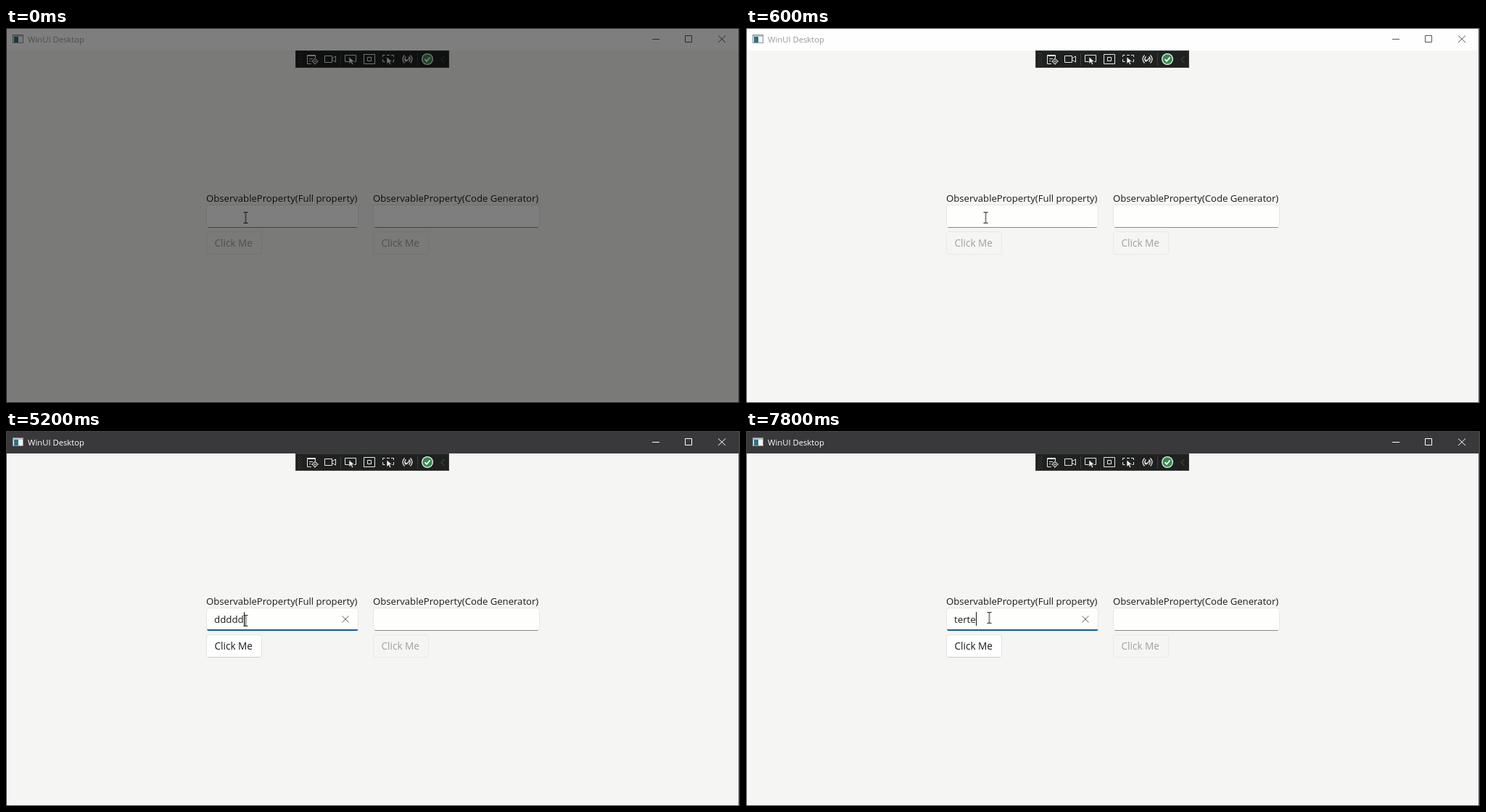
An HTML page that plays this animation: 1012x518 px, repeating every 8000 ms.

```html
<!DOCTYPE html>
<html lang="en">
<head>
<meta charset="utf-8">
<title>WinUI Desktop</title>
<style>
  html, body { margin: 0; width: 100%; height: 100%; overflow: hidden; background: #f5f5f4; }
  svg { position: absolute; left: 0; top: 0; width: 1012px; height: 518px; display: block; }
  svg, .entry { font-family: "Open Sans", "Noto Sans", sans-serif; }
  .label { font-size: 13.13px; fill: #1b1b1b; }
  .caption { font-size: 13.6px; fill: currentColor; }
  .title { font-size: 11.27px; fill: currentColor; }
  .line { fill: none; stroke: currentColor; }
  .field { fill: #fefefd; stroke: #e6e6e5; }
  .button { fill: #f5f5f4; stroke: #e8e8e7; color: #a1a1a1; }
  .button text { stroke: none; }

  .entry { position: absolute; left: 287px; top: 250px; height: 20px; display: flex;
           font-size: 13.3px; line-height: 20px; color: #1b1b1b; white-space: nowrap; }
  .entry span { flex: none; width: 0; overflow: hidden; }
  .entry i { flex: none; width: 1px; height: 19px; background: #111; }

  .bar, .fg, .hover, .focus, .live, .clear, .first, .second, .pointer, .dim, .entry i {
    animation: 8s step-end infinite; }
  .bar { animation-name: bar; }
  .fg { animation-name: fg; }
  .hover { animation-name: hover; }
  .focus, .entry i { animation-name: focus; }
  .live { animation-name: live; fill: #fefefe; stroke: #e3e3e2; color: #1b1b1b; }
  .clear { animation-name: clear; }
  .first { animation-name: first; }
  .second { animation-name: second; }
  .pointer { animation-name: pointer; }
  .dim { animation-name: dim; }

  @keyframes dim { 0% { opacity: .5 } 2.5%, 100% { opacity: 0 } }
  @keyframes bar { 0% { fill: #fefefe } 22.5%, 100% { fill: #39393b } }
  @keyframes fg { 0% { color: var(--idle) } 22.5%, 100% { color: #fff } }
  @keyframes hover { 0% { fill: #fefefd } 2.5% { fill: #f9f9fd } 5%, 100% { fill: #fefefd } }
  @keyframes focus { 0% { opacity: 0 } 22.5%, 100% { opacity: 1 } }
  @keyframes live {
    0% { opacity: 0 } 35% { opacity: 1 } 77.5% { opacity: 0 } 92.5%, 100% { opacity: 1 }
  }
  @keyframes clear {
    0% { opacity: 0 } 32.5% { opacity: 1 } 75% { opacity: 0 } 90%, 100% { opacity: 1 }
  }
  @keyframes first {
    0% { width: 0 } 32.5% { width: .613em } 37.5% { width: 1.226em }
    42.5% { width: 1.839em } 45% { width: 3.065em } 67.5% { width: 2.452em }
    70% { width: 1.839em } 72.5% { width: .613em } 75%, 100% { width: 0 }
  }
  @keyframes second {
    0% { width: 0 } 90% { width: .353em } 92.5% { width: .914em }
    95% { width: 1.675em } 97.5%, 100% { width: 2.236em }
  }
  @keyframes pointer {
    0% { transform: translate(330.5px, 262px) }
    67.5% { transform: translate(333.5px, 262px) }
    70% { transform: translate(334.5px, 255px) }
    72.5% { transform: translate(335.5px, 255px) }
    82.5%, 100% { transform: translate(335.5px, 258px) }
  }
</style>
</head>
<body>
<svg viewBox="0 0 1012 518">
  <defs>
    <path id="arrow" d="M0 0v9.5l2.4-2.2 1.7 3.4 1.7-.9-1.7-3.2h3.2z" fill="#f0f0f0" stroke="#1f2120" stroke-width=".6"/>
    <pattern id="grip" x="403" y="35" width="4" height="4" patternUnits="userSpaceOnUse">
      <path d="M0 0h1v1h-1zM2 2h1v1h-1z" fill="#50524f"/>
    </pattern>
  </defs>
  <rect width="1012" height="518" fill="#f5f5f4"/>

  <!-- title bar -->
  <rect class="bar" width="1012" height="31"/>
  <rect x="9.5" y="9.5" width="14" height="11" fill="#f4f6f6" stroke="#8b9296"/>
  <path d="M10 10h13v2h-13z" fill="#b9c3c8"/>
  <path d="M11 12h6v8h-6z" fill="#2d7183"/>
  <g class="fg" style="--idle:#999">
    <text class="title" x="30" y="20">WinUI Desktop</text>
  </g>
  <g class="fg" style="--idle:#555">
    <path class="line" d="M891 15.5h10M936.5 10.5h9v9h-9z"/>
    <path class="line" d="M982 10.5l10 9.5M992 10.5l-10 9.5"/>
  </g>

  <!-- debug toolbar -->
  <rect x="399.5" y="31.5" width="211" height="23" fill="#1f2120" stroke="#3c403d"/>
  <rect x="403" y="35" width="5" height="17" fill="url(#grip)"/>
  <path d="M461.5 35v17M567.5 35v17" stroke="#3d403e"/>
  <g fill="none" stroke="#e6e6e6">
    <path d="M421 49.500h-5.500v-12h11v4M415 38.500h12M418 42.500h5M418 45.500h2"/>
    <circle cx="426" cy="46" r="3"/>
    <circle cx="426" cy="46" r=".8"/>
    <path d="M426 41v2M426 49v2M421 46h2M429 46h2"/>
    <path d="M439.500 38.500h10v9h-10zM449.500 42l5-3v8l-5-3"/>
    <path d="M473 46.500h-5.500v-9h15v9h-3"/>
    <path d="M493.500 36.500h15v13h-15zM498.500 40.500h5v5h-5z"/>
    <path d="M519.500 40v-2.500h3M525 37.500h4M531 37.500h3.500v2.500M519.500 43v3.500h3M534.500 43v3.500h-2"/>
    <path d="M549.500 37.500q-5 5.500 0 11M557.500 37.500q5 5.500 0 11M551.500 39.500q-3.500 3.500 0 7M555.500 39.500q3.500 3.500 0 7" stroke-width="1.300"/>
    <path d="M550.500 43.500l2 2 4.500-5" stroke-width="1.300"/>
  </g>
  <use href="#arrow" x="473" y="40"/>
  <use href="#arrow" x="525" y="40"/>
  <circle cx="581" cy="43" r="8" fill="#e9f2e9"/>
  <circle cx="581" cy="43" r="6.700" fill="#388a4c"/>
  <path d="M577.500 43.200l2.500 2.600 4.600-5.300" fill="none" stroke="#fff" stroke-width="1.800"/>
  <path d="M604.500 39l-4.500 4.500 4.500 4.500" fill="none" stroke="#555855"/>

  <!-- left column -->
  <text class="label" x="276" y="240">ObservableProperty(Full property)</text>
  <rect class="field hover" x="276.500" y="244.500" width="209" height="31" rx="3.500"/>
  <path d="M278.500 275.500h205" stroke="#868686"/>
  <path class="focus" d="M277 274h208.500q-.5 2-2.500 2h-203.500q-2 0-2.500-2z" fill="#0b5a9e"/>
  <path class="line clear" d="M463.500 255.500l9 9M472.500 255.500l-9 9" color="#666"/>
  <g class="button">
    <rect x="276.500" y="281.500" width="76" height="31" rx="3.500"/>
    <text class="caption" x="287.500" y="302">Click Me</text>
  </g>
  <g class="live">
    <rect x="276.500" y="281.500" width="76" height="31" rx="3.500"/>
    <path d="M279 312.500h71" stroke="#cbcbca"/>
    <text class="caption" x="287.500" y="302" stroke="none">Click Me</text>
  </g>

  <!-- right column -->
  <text class="label" x="506" y="240">ObservableProperty(Code Generator)</text>
  <rect class="field" x="506.500" y="244.500" width="229" height="31" rx="3.500"/>
  <path d="M508.500 275.500h225" stroke="#868686"/>
  <g class="button">
    <rect x="506.500" y="281.500" width="76" height="31" rx="3.500"/>
    <text class="caption" x="517.500" y="302">Click Me</text>
  </g>

  <!-- window edge -->
  <path d="M0 0h1012v518h-1012zM1 1v516h1009v-516z" fill="#444" fill-rule="evenodd"/>
</svg>

<div class="entry"><span class="first">ddddd</span><span class="second">terte</span><i></i></div>

<svg viewBox="0 0 1012 518">
  <g class="pointer">
    <path d="M-3-7.500h2q1 0 1 1q0-1 1-1h2M0-7v14M-3 7.500h2q1 0 1-1q0 1 1 1h2" fill="none" stroke="#1a1a1a"/>
  </g>
  <rect class="dim" width="1012" height="518"/>
</svg>
</body>
</html>
```
